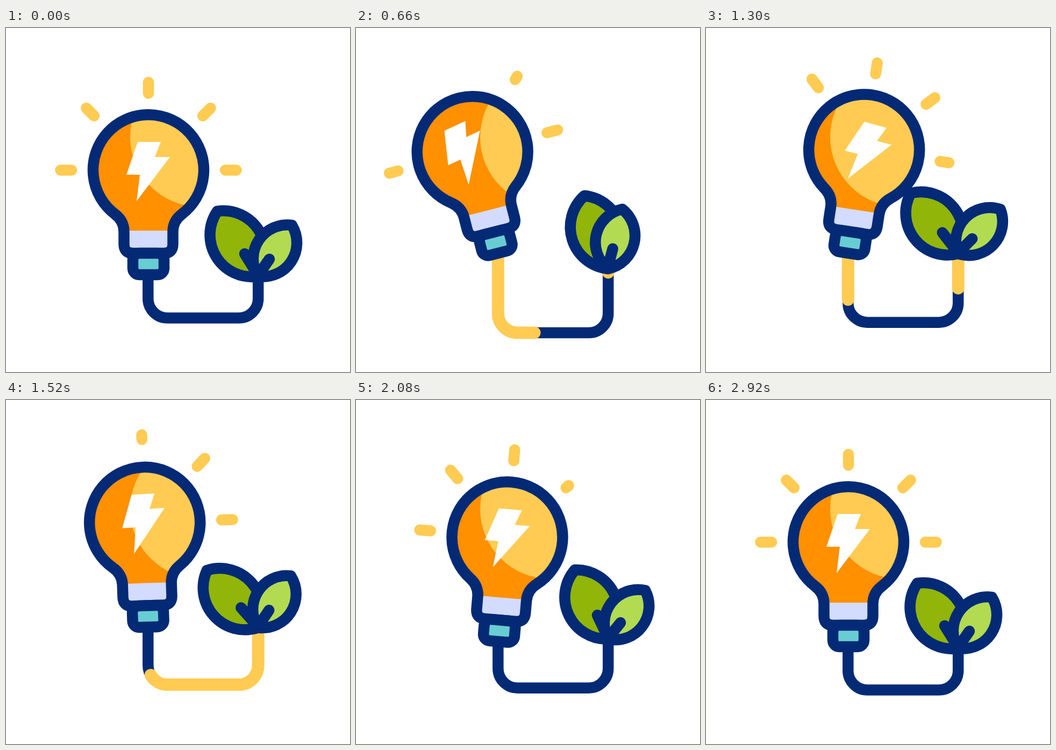
These frames come from a looping animation (640x640 px, 3.6 s). An HTML page:

```html
<!DOCTYPE html>
<html lang="en">
<head>
<meta charset="utf-8">
<title>Green energy</title>
<style>
  html, body { margin: 0; width: 100%; height: 100%; overflow: hidden; background: #fff; }
  svg { display: block; width: 100vw; height: 100vh; }
  .line { fill: none; stroke: #042a76; stroke-width: 20.5; stroke-linecap: round; stroke-linejoin: round; }
  .glow { fill: none; stroke: #ffcb52; stroke-width: 20.5; stroke-linecap: round; }
  .pulse { stroke-width: 23; }
</style>
</head>
<body>
<svg viewBox="0 0 640 640">
  <defs>
    <path id="glass" d="M203 346.5A103 103 0 1 1 327 346.5C316.5 354.5 310.5 366 310.5 379V402Q310.5 419 294 419H236Q219.5 419 219.5 402V379C219.5 366 213.5 354.5 203 346.5Z"/>
    <clipPath id="inside"><use class="bulb" href="#glass"/></clipPath>
  </defs>

  <path id="cord" class="line" style="stroke-linecap:butt"/>
  <g id="pulses"></g>

  <g class="bulb">
    <g id="rays"></g>
    <use href="#glass" fill="#ff9000"/>
  </g>
  <g clip-path="url(#inside)"><circle cx="360.5" cy="203" r="129.5" fill="#ffcb52"/></g>
  <g class="bulb">
    <path d="M225 377H305V408Q305 414 299 414H231Q225 414 225 408Z" fill="#d3dbfe"/>
    <use href="#glass" class="line"/>
    <rect class="line" x="236" y="419" width="58" height="40" rx="12" style="fill:#68cdd3"/>
    <path id="bolt" d="M245 212H288L277 240H305L243 322L249 273H224Z" fill="#fff"/>
  </g>

  <g id="leafLeft">
    <path class="line" style="fill:#91b508" d="M393 341A78 78 0 0 1 469 462A78 78 0 0 1 393 341Z"/>
    <path class="line" d="M444 420L469 460"/>
  </g>
  <g id="leafRight">
    <path class="line" style="fill:#b2db52" d="M532 367A63 63 0 0 1 469 462A63 63 0 0 1 532 367Z"/>
    <path class="line" d="M490 430L469 460"/>
  </g>
</svg>
<script>
const LOOP = 3600;
const BULB_BEATS = [0, 580, 1190, 1710, 2070, 2330, 2640];
const LEAF_BEATS = [0, 640, 1530, 2070, 2430, 2720, 2920];

const $ = id => document.getElementById(id);

// Eased progress from 0 to 1 between two times.
function ramp(t, from, to) {
  const p = Math.min(1, Math.max(0, (t - from) / (to - from)));
  return (1 - Math.cos(Math.PI * p)) / 2;
}

// A swing that starts and ends at rest; each extreme is smaller and opposite to the last.
function sway(t, beats, first, ratio) {
  const last = beats.length - 1;
  if (t >= beats[last]) return 0;
  const extreme = k => k === 0 || k === last ? 0 : first * (-ratio) ** (k - 1);
  const k = beats.findIndex(beat => beat > t);
  const a = extreme(k - 1), b = extreme(k);
  return a + (b - a) * ramp(t, beats[k - 1], beats[k]);
}

function addPath(parent, className, attrs) {
  const path = document.createElementNS("http://www.w3.org/2000/svg", "path");
  path.setAttribute("class", className);
  for (const key in attrs) path.setAttribute(key, attrs[key]);
  return $(parent).appendChild(path);
}

const rays = [-90, -45, 0, 45, 90].map(angle =>
  addPath("rays", "glow", { transform: `translate(265 264.5) rotate(${angle})` }));
const pulses = [0, 1, 2].map(() => addPath("pulses", "glow pulse", { pathLength: 1 }));
const bulbParts = document.querySelectorAll(".bulb");

function show(el, from, to) {
  el.style.display = to - from > 0.004 ? "" : "none";
}

// Each ray leaves outward and grows back from the inside, in two rounds.
function drawRay(ray, i, t) {
  const first = 84 + 160 * i, second = 1137 + 147 * i;
  const leave = t < second ? first : second;
  const grow = leave + 420;
  const from = t < grow ? ramp(t, leave, leave + 165) : 0;
  const to = t < grow ? 1 : ramp(t, grow, grow + 220);
  show(ray, from, to);
  ray.setAttribute("d", `M0 ${-143 - 20.5 * from}V${-143 - 20.5 * to}`);
}

function drawPulse(pulse, i, t, route) {
  const time = t - 550 * i;
  const head = ramp(time, 70, 590), tail = ramp(time, 387, 907);
  show(pulse, tail, head);
  pulse.setAttribute("d", route);
  pulse.setAttribute("stroke-dasharray", `${head - tail} 2`);
  pulse.setAttribute("stroke-dashoffset", -tail);
}

function draw(t) {
  const lift = -46 * ramp(t, 0, 860) + 6 * ramp(t, 860, 1300) + 40 * ramp(t, 1300, 2460);
  const leafLift = -42.5 * (ramp(t, 310, 1210) - ramp(t, 1210, 2760));
  const bottom = 539.5 + 32.5 * ramp(t, 0, 890) - 48.5 * ramp(t, 890, 1710) + 16 * ramp(t, 1710, 2260);

  const route = `M469.2 ${462 + leafLift}V${bottom - 36}a36 36 0 0 1 -36 36H300.3a36 36 0 0 1 -36 -36V${456 + lift}`;
  $("cord").setAttribute("d", route);
  pulses.forEach((pulse, i) => drawPulse(pulse, i, t, route));
  rays.forEach((ray, i) => drawRay(ray, i, t));

  const swing = sway(t, BULB_BEATS, -15.5, 0.68);
  const boltTilt = 0.76 * swing * (1 - ramp(t, 1600, 2100));
  bulbParts.forEach(part =>
    part.setAttribute("transform", `translate(0 ${lift}) rotate(${swing} 265 459)`));
  $("bolt").setAttribute("transform", `rotate(${boltTilt} 243 322)`);

  const placeLeaf = (id, angle) =>
    $(id).setAttribute("transform", `translate(0 ${leafLift}) rotate(${angle} 469 462)`);
  placeLeaf("leafLeft", sway(t, LEAF_BEATS, 14.2, 0.68));
  placeLeaf("leafRight", sway(t, BULB_BEATS, -21.6, 0.56));
}

const start = performance.now();
function tick() {
  draw((performance.now() - start) % LOOP);
  requestAnimationFrame(tick);
}
tick();
</script>
</body>
</html>
```
